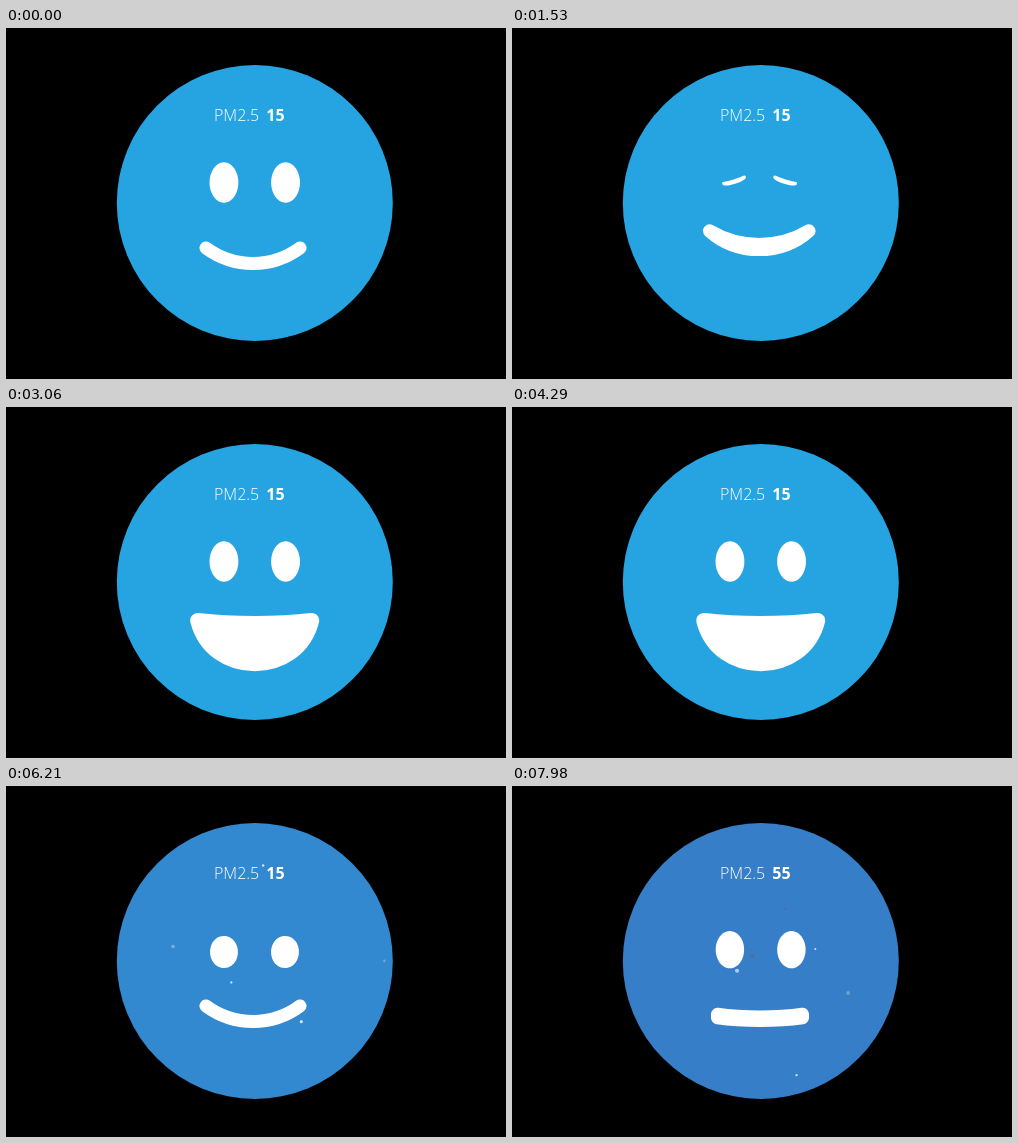
Write an HTML page that moves like this. It is 500 px wide and 351 px high and loops after 8 s.

```html
<!DOCTYPE html>
<html lang="en">
<head>
<meta charset="utf-8">
<title>Air quality face</title>
<style>
  html, body { margin: 0; width: 100%; height: 100%; overflow: hidden; background: #000; }
  svg { display: block; width: 100vw; height: 100vh; }
  text { font: 300 16px "Open Sans", sans-serif; fill: #fff; }
  #count { font-weight: 700; text-anchor: middle; }
  #mouth { stroke: #fff; stroke-linejoin: round; }
  #face { animation: haze 8s linear infinite; }
  @keyframes haze {
    0%, 61% { fill: #26a4e2; }
    83.5%, 100% { fill: #367fc8; }
  }
</style>
</head>
<body>
<svg viewBox="0 0 500 351">
  <clipPath id="disc"><circle cx="248.8" cy="175" r="138"/></clipPath>
  <circle id="face" cx="248.8" cy="175" r="138"/>
  <g id="dust" clip-path="url(#disc)"></g>
  <text x="208" y="93">PM2.5</text>
  <text id="count" x="269.5" y="93"></text>
  <g fill="#fff">
    <path id="left"/>
    <path id="right"/>
    <path id="mouth"/>
  </g>
</svg>
<script>
const LOOP = 8000;
const $ = id => document.getElementById(id);
const clamp = v => Math.min(1, Math.max(0, v));
const mix = (a, b, k) => a + (b - a) * k;
const ease = k => (1 - Math.cos(Math.PI * k)) / 2;

const EYES = {
  open: { squint: 0, y: 154.5 },
  shut: { squint: 1, y: 152.2 },
  half: { squint: .64, y: 165 },
  soft: { squint: .235, y: 166 },
  calm: { squint: .09, y: 163.7 }
};

// half: half width; upper and lower: how far each lip sags; edge: height of the ends
const MOUTHS = {
  smile: { x: 247, y: 220, half: 47, upper: 15.5, lower: 15.5, edge: 0 },
  lifted: { x: 247, y: 201.5, half: 48.5, upper: 15, lower: 15, edge: 0 },
  laugh: { x: 248.7, y: 213.5, half: 57, upper: 3, lower: 43.3, edge: 0 },
  flat: { x: 248, y: 228.3, half: 42.5, upper: 2.7, lower: 2.7, edge: 3.4 }
};

const eyeMoves = [
  [150, 'open'], [650, 'shut'], [1750, 'shut'], [2070, 'half'], [2350, 'open'],
  [5250, 'open'], [6140, 'soft'], [7200, 'soft'], [7980, 'calm']
];
const mouthMoves = [
  [50, 'smile'], [650, 'lifted'], [1350, 'lifted'], [2140, 'laugh'],
  [5430, 'laugh'], [6230, 'smile'], [7250, 'smile'], [7980, 'flat']
];

function pose(poses, moves, t) {
  const found = moves.findIndex(move => move[0] > t);
  const next = found < 0 ? moves.length - 1 : Math.max(1, found);
  const [t0, a] = moves[next - 1], [t1, b] = moves[next];
  const k = ease(clamp((t - t0) / (t1 - t0)));
  const result = {};
  for (const name in poses[a]) result[name] = mix(poses[a][name], poses[b][name], k);
  return result;
}

// A superellipse that flattens, tilts and bends as the eye closes.
function eyePath({ squint, y }, side) {
  const rx = mix(14.4, 12.3, squint), ry = mix(20.2, 2.3, squint);
  const mid = mix(248.75, 247.6, squint), gap = mix(30.8, 25.6, squint ** 2);
  const tilt = -.3 * squint ** 2, bend = 1.5 * squint ** 4;
  const power = mix(1, .55, squint ** 2);
  const square = v => Math.sign(v) * Math.abs(v) ** power;
  const points = [];
  for (let i = 0; i < 48; i++) {
    const a = i / 48 * 2 * Math.PI;
    const u = square(Math.cos(a));
    const ex = rx * u, ey = ry * square(Math.sin(a)) + bend * (1 - u * u);
    const px = ex * Math.cos(tilt) - ey * Math.sin(tilt) - gap;
    const py = ex * Math.sin(tilt) + ey * Math.cos(tilt) + y;
    points.push((mid + side * px).toFixed(2) + ',' + py.toFixed(2));
  }
  return 'M' + points.join('L') + 'Z';
}

function drawMouth({ x, y, half, upper, lower, edge }) {
  const gape = (lower - upper) / 40;
  const l = x - half, r = x + half, low = y + edge;
  const upIn = half * .6, lowIn = half * mix(.6, .25, gape);
  const upY = y + upper * 4 / 3, lowY = low + lower * 4 / 3;
  $('mouth').setAttribute('d',
    `M${l},${y}C${l + upIn},${upY} ${r - upIn},${upY} ${r},${y}V${low}` +
    `C${r - lowIn},${lowY} ${l + lowIn},${lowY} ${l},${low}Z`);
  $('mouth').setAttribute('stroke-width', 13 + 2 * gape);
}

// Specks of dust arrive ever more often; some late ones are dark.
const SPECKS = 14;
const random = n => Math.abs(Math.sin(n * 12.9898) * 43758.5453) % 1;
const specks = Array.from({ length: SPECKS }, (_, i) => {
  const node = document.createElementNS('http://www.w3.org/2000/svg', 'circle');
  const peak = 5610 + 2370 * (i / (SPECKS - 1)) ** .6;
  const dark = peak > 7500 && i % 2 === 0;
  const angle = i * 2.4, reach = 130 * Math.sqrt(random(i + 1));
  node.setAttribute('r', mix(1, 2.3, random(i + 50)));
  node.setAttribute('fill', dark ? '#5b6780' : '#e4eefa');
  $('dust').append(node);
  return { node, peak, angle, reach, alpha: dark ? .6 : .9 };
});

function drawSpeck({ node, peak, angle, reach, alpha }, t) {
  const age = (t - peak) / 1000;
  const distance = reach + 8 * age;
  node.setAttribute('cx', 248.8 + distance * Math.cos(angle));
  node.setAttribute('cy', 175 + distance * Math.sin(angle));
  node.setAttribute('opacity', alpha * clamp((.7 - Math.abs(age)) / .3));
}

function draw(t) {
  $('count').textContent = Math.round(mix(15, 55, clamp((t - 7200) / 750)));
  const eyes = pose(EYES, eyeMoves, t);
  $('left').setAttribute('d', eyePath(eyes, 1));
  $('right').setAttribute('d', eyePath(eyes, -1));
  drawMouth(pose(MOUTHS, mouthMoves, t));
  specks.forEach(speck => drawSpeck(speck, t));
}

const start = performance.now();
function tick() {
  draw((performance.now() - start) % LOOP);
  requestAnimationFrame(tick);
}
tick();
</script>
</body>
</html>
```
